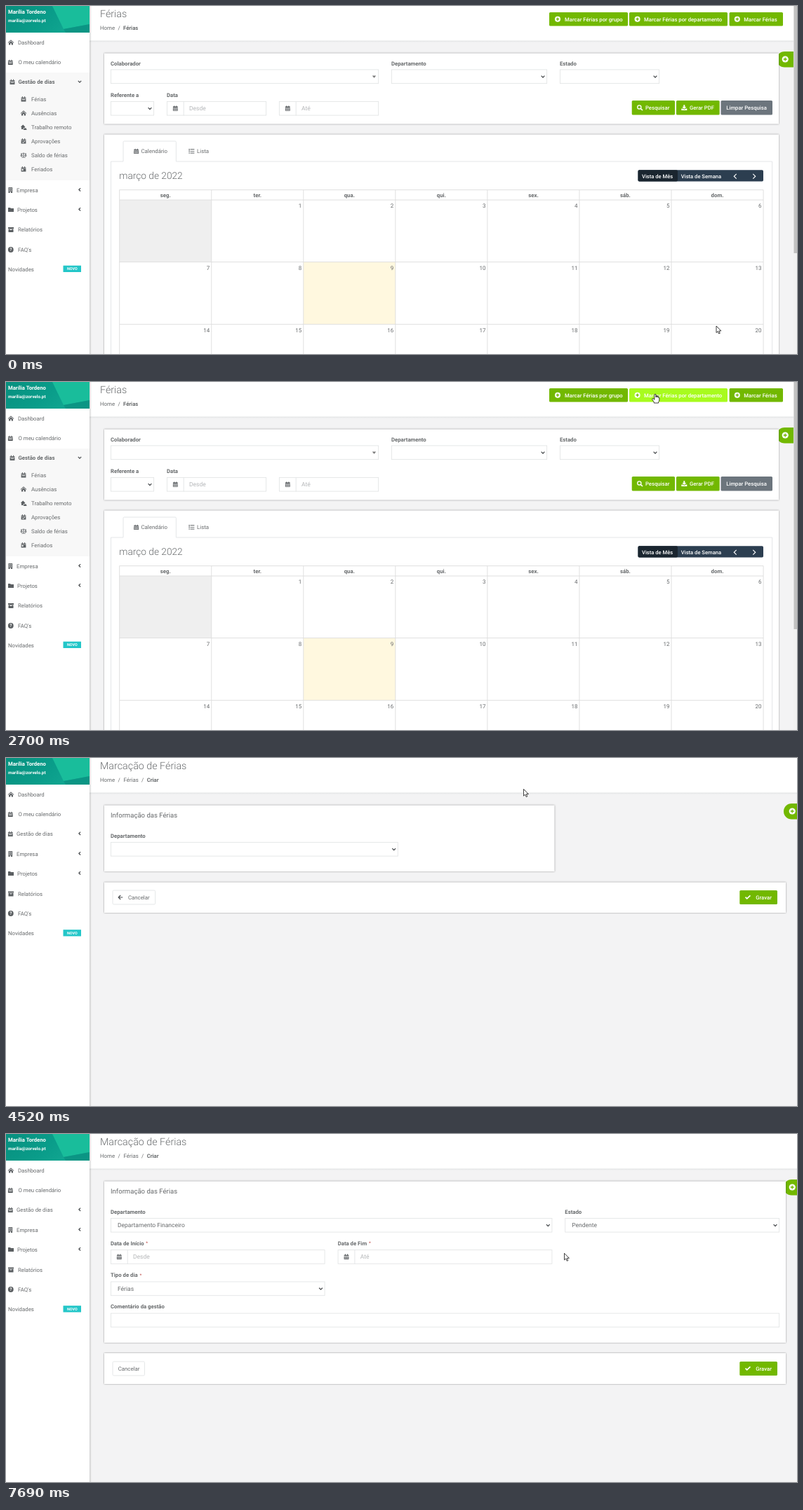
These frames come from a looping animation (1127x497 px, 8000 ms). An HTML page:

```html
<!DOCTYPE html>
<html lang="pt">
<head>
<meta charset="utf-8">
<title>Marcação de Férias</title>
<style>
  html, body { margin: 0; width: 100%; height: 100%; overflow: hidden; background: #f3f3f4; }
  svg { display: block; width: 1127px; height: 497px; }
  text { font-family: Roboto, "Open Sans", sans-serif; text-rendering: geometricPrecision; }
  .card { fill: #fff; filter: drop-shadow(0 .9px .8px rgba(0, 0, 0, .42)); }
</style>
</head>
<body>
<svg id="stage" viewBox="0 0 1127 497"></svg>
<script>
const GREEN = '#72b800', LIME = '#a8fb1e', GREY = '#676a6c', LINE = '#e3e5e6', GRID = '#dddddd';
const LOOP = 8000;

// Drawing helpers; text is placed by the middle of its capitals.
const text = (x, y, s, size = 7.85, weight = 400, fill = GREY, anchor = 'start') =>
  `<text x="${x}" y="${y + size * .355}" font-size="${size}" font-weight="${weight}" fill="${fill}" text-anchor="${anchor}">${s}</text>`;
const box = (x1, y1, x2, y2, fill, extra = '') =>
  `<rect x="${x1}" y="${y1}" width="${x2 - x1}" height="${y2 - y1}" fill="${fill}" ${extra}/>`;
const stroke = (d, color, width = 1, extra = '') =>
  `<path d="${d}" fill="none" stroke="${color}" stroke-width="${width}" ${extra}/>`;
const card = (x1, y1, x2, y2) => box(x1, y1, x2, y2, '#fff', 'class="card"');
const label = (x, y, s) => text(x, y, s, 7.75, 700);
const group = (id, body, hidden) => `<g id="${id}"${hidden ? ' display="none"' : ''}>${body}</g>`;

const CAL = 'M-3.4-2.6H-2.1V-3.8H-1V-2.6H1V-3.8H2.1V-2.6H3.4V-1.3H-3.4ZM-3.4-.7H3.4V3.6H-3.4Z';
const HOME = 'M-4.4 .2L0-3.8L4.4 .2L3.8 .8L0-2.6L-3.8 .8ZM-3 .9L0-1.8L3 .9V3.6H.8V1.3H-.8V3.6H-3Z';
const ICONS = {
  cal: CAL + 'M-2.2 .3V1.3H2.2V.3Z',
  days: CAL + 'M-2.5 .1V1H-1.2V.1ZM-.6 .1V1H.6V.1ZM1.2 .1V1H2.5V.1ZM-2.5 1.8V2.7H-1.2V1.8ZM-.6 1.8V2.7H.6V1.8ZM1.2 1.8V2.7H2.5V1.8Z',
  check: CAL + 'M-2 1.2L-.5 2.8L2.2 .3L1.6-.2L-.5 1.7L-1.4 .7Z',
  day: CAL + 'M-2.4 0V2H-.4V0Z',
  home: HOME,
  remote: 'M-4.2-.2L-.8-3.5L2.6-.2H1.6V1H-.4V3H-3V-.2ZM.3 1.5H4V3.3H4.6V4H-.1V3.3H.3Z',
  scale: 'M-4-2.6H-.5V-3.6H.5V-2.6H4V-1.9H3.4L4.5 1Q3 2.8 1.4 1L2.5-1.9H.5V2.8H2.8V3.5H-2.8V2.8H-.5V-1.9H-2.5L-1.4 1Q-3 2.8-4.5 1L-3.4-1.9H-4ZM-3-1L-3.7 .8H-2.3ZM3-1L2.3 .8H3.7Z',
  building: 'M-2.8-4H2.8V4H.7V2.2H-.7V4H-2.8ZM-1.7-3V-2.1H-.5V-3ZM.5-3V-2.1H1.7V-3ZM-1.7-1.2V-.3H-.5V-1.2ZM.5-1.2V-.3H1.7V-1.2ZM-1.7 .5V1.4H-.5V.5ZM.5 .5V1.4H1.7V.5Z',
  folder: 'M-4-3H-1L0-2H4V3H-4Z',
  archive: 'M-4-3.4H4V-1.6H-4ZM-3.5-1.1H3.5V3.4H-3.5ZM-1.2-.4V.4H1.2V-.4Z',
  list: 'M-4-3.3H-2.6V-1.9H-4ZM-1.8-3H4V-2.1H-1.8ZM-4-.7H-2.6V.7H-4ZM-1.8-.4H4V.4H-1.8ZM-4 1.9H-2.6V3.3H-4ZM-1.8 2.2H4V3.1H-1.8Z',
  download: 'M-1-4H1V-1.2H3L0 1.8L-3-1.2H-1ZM-4 1.4H-1.6L0 2.9L1.6 1.4H4V3.8H-4Z',
  tick: 'M-4 .3L-2.9-.9L-1.3 .7L2.9-3.3L4-2.1L-1.3 3.1Z',
};
const icon = (name, x, y, fill = '#5b5f62') =>
  `<path transform="translate(${x} ${y})" d="${ICONS[name]}" fill="${fill}" fill-rule="evenodd"/>`;
const plus = (x, y, r = 4, back = GREEN) =>
  `<circle cx="${x}" cy="${y}" r="${r}" fill="#fff"/>` + stroke(`M${x - r * .55} ${y}h${r * 1.1}M${x} ${y - r * .55}v${r * 1.1}`, back, 1.3);
const chevron = (x, y, dx, dy, color = '#4c4f52', width = 1.3) => dx
  ? stroke(`M${x + dx} ${y - 2 * Math.abs(dx)}L${x - dx} ${y}L${x + dx} ${y + 2 * Math.abs(dx)}`, color, width)
  : stroke(`M${x - 2 * dy} ${y - dy}L${x} ${y + dy}L${x + 2 * dy} ${y - dy}`, color, width);

const field = (x1, y1, x2, y2 = y1 + 20.5) => box(x1 + .4, y1 + .4, x2 - .4, y2 - .4, '#fff', `stroke="${LINE}" stroke-width=".9"`);
const select = (x1, y, x2, value = '') =>
  field(x1, y, x2) + chevron(x2 - 6, y + 10.3, 0, 1.2) + (value && text(x1 + 10, y + 10.3, value, 8.5));
const dateField = (x1, y, x2, hint) => field(x1, y, x2) + stroke(`M${x1 + 24.2} ${y}v20.5`, LINE, .9) +
  icon('days', x1 + 12.3, y + 10.2) + text(x1 + 32, y + 10.2, hint, 8.5, 400, '#b4b6b8');
const button = (x1, y1, x2, y2, fill, tx, s, id = '') =>
  box(x1, y1, x2, y2, fill, `rx="1.6"${id && ` id="${id}"`}`) + text(tx, (y1 + y2) / 2, s, 7.7, 500, '#fff');

function sidebar(open) {
  const rows = open ? [52, 80.5, 108.5, 263, 291, 319.5, 348, 376] : [52, 80.5, 108.5, 137, 165, 194, 222, 250.5];
  const names = ['Dashboard', 'O meu calendário', 'Gestão de dias', 'Empresa', 'Projetos', 'Relatórios', "FAQ's", 'Novidades'];
  const icons = ['home', 'cal', 'cal', 'building', 'folder', 'archive'];
  const lefts = [17, 17.5, open ? 17.5 : 15, 15, 16, 17, 17, 3];
  const subs = [['cal', 'Férias'], ['home', 'Ausências'], ['remote', 'Trabalho remoto'], ['check', 'Aprovações'], ['scale', 'Saldo de férias'], ['day', 'Feriados']];
  let s = box(0, 0, 119, 497, '#fff');
  if (open) {
    s += box(0, 95, 119, 249, '#f8f8f8');
    s += [['cal', 67, 95], ['manage', 95, 123], ['leave', 123.3, 143]]
      .map(([id, y1, y2]) => group('hover-' + id, box(0, y1, 119, y2, GREEN), true)).join('');
    s += subs.map(([i, name], k) => icon(i, 25, 133 + 20 * k) + text(36, 133 + 20 * k, name)).join('');
  }
  s += box(0, 0, 119, 38, 'url(#teal)') + '<path d="M66 0H119V26L82 33Z" fill="#19bd9b"/><path d="M82 33L119 26V38H85Z" fill="#0b9584"/>';
  s += text(3, 8, 'Marília Tordeno', 7.7, 700, '#fff') + text(3, 20.5, 'marilia@zorvelo.pt', 6.3, 700, '#fff');
  rows.forEach((y, k) => {
    const bold = open && k === 2;
    s += text(lefts[k], y, names[k], 7.8, bold ? 700 : 400);
    if (icons[k]) s += icon(icons[k], bold ? 9 : k === 0 || k > 3 ? 7 : 6.3, y);
    if (bold) s += chevron(105, y - .5, 0, 1.1);
    else if (k > 1 && k < 5) s += chevron(105, y - .7, 1.1, 0);
  });
  s += `<circle cx="6.8" cy="${rows[6]}" r="3.9" fill="#5b5f62"/>` + text(6.8, rows[6], '?', 6.5, 700, '#fff', 'middle');
  return s + box(81.5, rows[7] - 5.3, 107, rows[7] + 4, '#23c6c8') + text(94.3, rows[7] - .6, 'NOVO', 5.4, 700, '#fff', 'middle');
}

function frame(open, title, crumbs) {
  const edge = open ? 1122 : 1127, x = open ? 1098 : 1108;
  let s = box(0, 0, 1127, 497, '#f3f3f4') + box(119, 0, edge, 52, 'url(#under)') + box(119, 0, edge, 49.5, '#fff');
  s += sidebar(open) + box(119, 0, 122, 497, 'url(#side)');
  s += text(134, 11, title, 14.3, 300) + crumbs;
  s += `<path d="M${edge} 65H${x + 11.3}a11.3 11.3 0 0 0 0 22.6H${edge}Z" fill="${GREEN}"/>` + plus(x + 12.2, 76, 4.6);
  return open ? s + box(1122, 0, 1127, 497, '#f1f1f1') + box(1122.5, 0, 1127, 353, '#c1c1c1') : s;
}

function calendar() {
  const left = 161.7, col = 131.05, right = left + 7 * col, tops = [277, 365.6, 454.6];
  const days = ['seg.', 'ter.', 'qua.', 'qui.', 'sex.', 'sáb.', 'dom.'];
  let s = box(left, 277, left + col, 365.6, '#efefef') + box(left + 2 * col, 365.6, left + 3 * col, 454.6, '#fff8df');
  let lines = `M${left} 262.6H${right}` + tops.map(y => `M${left} ${y}H${right}`).join('');
  for (let c = 0; c <= 7; c++) lines += `M${left + c * col} 262.6V497`;
  s += stroke(lines, GRID, .9);
  days.forEach((d, c) => {
    s += text(left + (c + .5) * col, 269.8, d, 7.8, 700, GREY, 'middle');
    tops.forEach((y, r) => {
      const n = r * 7 + c;
      if (n) s += text(left + (c + 1) * col - 2.5, y + 8.4, n, 8, 400, GREY, 'end');
    });
  });
  return s;
}

function listPage() {
  let s = frame(true, 'Férias', text(134, 31.3, 'Home') + text(159.5, 31.3, '/') + text(167, 31.3, 'Férias', 7.7, 700));
  s += button(774, 9, 886, 28.6, GREEN, 796, 'Marcar Férias por grupo', 'btn-group') + plus(786, 18.7);
  s += button(888, 9, 1028, 28.6, GREEN, 909, 'Marcar Férias por departamento', 'btn-dept') + plus(899.6, 18.7);
  s += button(1030.6, 9, 1107, 28.6, GREEN, 1051.3, 'Marcar Férias') + plus(1041.8, 18.7);
  s += card(140, 67.5, 1101, 168.5);
  s += label(149, 82, 'Colaborador') + field(149, 90.5, 531) + '<path d="M521.8 99.4h5.4l-2.7 3.4Z" fill="#777"/>';
  s += label(549, 82, 'Departamento') + select(549, 90.5, 771) + label(789, 82, 'Estado') + select(789, 90.5, 931);
  s += label(149, 127, 'Referente a') + select(149, 136, 211);
  s += label(229, 127, 'Data') + dateField(229, 136, 371, 'Desde') + dateField(389, 136, 531, 'Até');
  s += button(891.7, 135, 953, 155.6, GREEN, 911, 'Pesquisar');
  s += '<circle cx="902.3" cy="144.4" r="2.6" fill="none" stroke="#fff" stroke-width="1.3"/>' + stroke('M904.2 146.3L907 149', '#fff', 1.6);
  s += button(955, 135, 1016.7, 155.6, GREEN, 974, 'Gerar PDF') + icon('download', 966.3, 145.2, '#fff');
  s += button(1018.5, 135, 1092, 155.6, '#6c757d', 1026.3, 'Limpar Pesquisa');
  s += card(140, 183.5, 1101, 510);
  s += stroke('M149.5 497V222H167V194.5Q167 193 168.5 193H241Q242.4 193 242.4 194.5V222H1091.6V497', '#e1e4e6', .9);
  s += icon('days', 185.6, 207.5) + text(192.5, 207.5, 'Calendário') + icon('list', 264.4, 207.3) + text(272, 207.5, 'Lista');
  s += text(161.3, 242.2, 'março de 2022', 13.7, 300);
  s += box(900.5, 234.2, 1079, 250.6, '#2c3e50', 'rx="1.8"') + box(900.5, 234.2, 957, 250.6, '#1a252f', 'rx="1.8"');
  s += text(906, 243, 'Vista de Mês', 7.6, 500, '#fff') + text(961.8, 243, 'Vista de Semana', 7.6, 500, '#fff');
  return s + chevron(1039, 243.2, 1.7, 0, '#fff', 1.2) + chevron(1066, 243.2, -1.7, 0, '#fff', 1.2) + calendar();
}

const createFrame = () => frame(false, 'Marcação de Férias', text(134, 31.3, 'Home') + text(159.5, 31.3, '/') +
  text(167.5, 31.3, 'Férias') + text(193, 31.3, '/') + text(200.7, 31.3, 'Criar', 7.7, 700));
const formTitle = text(149, 82, 'Informação das Férias', 9.55) + label(149, 111, 'Departamento');
const save = y => button(1045.3, y, 1099, y + 20, GREEN, 1068.3, 'Gravar') + icon('tick', 1057, y + 10, '#fff');
const cancel = (x2, y, tx) => box(152, y, x2, y + 20, '#fff', `rx="1.6" stroke="${LINE}" stroke-width=".9"`) + text(tx, y + 10, 'Cancelar', 7.8);

function departmentPage() {
  let s = createFrame() + card(140, 67.5, 781.5, 162) + formTitle + select(149, 120, 558.7);
  s += card(140, 177.5, 1111, 221) + cancel(212.7, 189, 174) + save(189);
  s += stroke('M166.3 199H160.4M163.2 196L160.2 199L163.2 202', '#4c4f52', 1.2);
  s += group('focus', box(149.5, 120.4, 558.3, 140.3, 'none', `stroke="${GREEN}" stroke-width="1"`), true);
  s += group('chosen', text(159, 130.4, 'Departamento Financeiro', 8.5), true);
  const menu = box(149.4, 141, 558.4, 173.8, '#fff', 'stroke="#6b6b6b" stroke-width=".8" style="filter:drop-shadow(0 1px 1.5px rgba(0,0,0,.3))"') +
    box(149.8, 141.2, 558, 152, '#1e90ff', 'id="mark"') +
    `<g id="option">${text(159, 157, 'Departamento Financeiro', 8.5, 400, 'inherit')}</g>` + text(159, 167.8, 'Departamento de Produção', 8.5, 400, '#555');
  return s + group('menu', menu, true);
}

function fullPage() {
  const star = (x, y) => text(x, y, '*', 6.5, 400, '#c0504d');
  let s = createFrame() + card(140, 67.5, 1111, 298) + formTitle + select(149, 120, 778.3, 'Departamento Financeiro');
  s += label(796.3, 111, 'Estado') + select(796.3, 120, 1102, 'Pendente');
  s += label(149, 156, 'Data de Início') + star(199.3, 156) + dateField(149, 165.2, 454.5, 'Desde');
  s += label(472.7, 156, 'Data de Fim') + star(517, 156) + dateField(472.7, 165.2, 778.3, 'Até');
  s += label(149, 201.7, 'Tipo de dia') + star(190.5, 201.7) + select(149, 210.6, 454.5, 'Férias');
  s += label(149, 246.5, 'Comentário da gestão') + field(149, 255.7, 1102);
  return s + card(140, 313, 1111, 357) + cancel(197.5, 325, 159.7) + save(325);
}

const gradient = (id, x2, y2, stops) => `<linearGradient id="${id}" x2="${x2}" y2="${y2}">` +
  stops.map(([o, c, a = 1]) => `<stop offset="${o}" stop-color="${c}" stop-opacity="${a}"/>`).join('') + '</linearGradient>';
document.getElementById('stage').innerHTML = '<defs>' +
  gradient('teal', 1, .3, [[0, '#07907f'], [.6, '#0a9d8a'], [1, '#12a892']]) +
  gradient('under', 0, 1, [[.92, '#d3d5d6'], [1, '#f3f3f4']]) +
  gradient('side', 1, 0, [[0, '#000', .16], [1, '#000', 0]]) + '</defs>' +
  group('list', listPage()) + group('department', departmentPage(), true) + group('full', fullPage(), true) +
  group('arrow', '<path d="M0 0V9.6L2.2 7.6L3.7 11L5.3 10.3L3.8 7H6.9Z" fill="#fff" stroke="#111" stroke-width=".8"/>') +
  group('hand', '<path d="M-1.1 1Q0-.8 1 1V4.6Q2-.0 2.8 4.8Q4-.0 4.3 5.2Q5.6 3.8 5.8 6V9Q5.5 10.8 4.6 11.5V13H-1.8V11.6Q-3.2 10-4.3 7.6Q-4.2 5.6-2.4 7L-1.1 8.2Z" fill="#fff" stroke="#111" stroke-width=".8"/>', true);

// Pointer moves: first and last step time, number of steps, end point.
const START = [1012, 457];
const MOVES = [
  [70, 440, 6, 60, 82], [830, 910, 2, 80, 108], [1220, 1680, 7, 100, 131], [1910, 1910, 1, 115.5, 121],
  [1990, 2700, 10, 925, 17], [2790, 2790, 1, 876, 15], [2870, 3030, 3, 912.5, 14.5],
  [4520, 4520, 1, 737.5, 44.5], [4600, 4900, 5, 576.5, 118.5], [5050, 5200, 3, 554.5, 130],
  [5830, 5830, 1, 530, 140.3], [6230, 6230, 1, 526.5, 146], [6370, 6450, 2, 526, 151.5], [6680, 6850, 3, 525.7, 154],
  [7320, 7460, 3, 795.5, 170.3],
];
const HOVERS = [[0, ''], [370, 'cal'], [830, 'manage'], [1300, 'leave'], [1990, ''], [2620, 'dept'], [2790, 'group'], [2870, 'dept'], [3660, '']];

function pointer(t) {
  let [x, y] = START;
  for (const [from, to, steps, endX, endY] of MOVES) {
    if (t < from) break;
    const step = steps === 1 ? 1 : Math.min(steps, 1 + Math.floor((t - from) / (to - from) * (steps - 1) + 1e-6));
    const u = step / steps, e = u * u * (3 - 2 * u);
    x += (endX - x) * e;
    y += (endY - y) * e;
  }
  return [x, y];
}

const $ = id => document.getElementById(id);
const show = (id, on) => $(id).setAttribute('display', on ? 'inline' : 'none');

function render(t) {
  const hover = HOVERS.filter(([from]) => t >= from).pop()[1];
  show('list', t < 3660);
  show('department', t >= 3660 && t < 7690);
  show('full', t >= 7690);
  ['cal', 'manage', 'leave'].forEach(id => show('hover-' + id, hover === id));
  ['group', 'dept'].forEach(id => $('btn-' + id).setAttribute('fill', hover === id ? LIME : GREEN));
  show('focus', t >= 5370);
  show('menu', t >= 5450 && t < 6680);
  show('chosen', t >= 6680);
  const second = t >= 6370;
  $('mark').setAttribute('y', second ? 152 : 141.2);
  $('option').setAttribute('fill', second ? '#fff' : '#555');
  $('option').firstChild.setAttribute('fill', second ? '#fff' : '#555');
  const hand = hover !== '' && t < 3510 || t >= 1910 && t < 1990;
  const [x, y] = pointer(t);
  for (const id of ['arrow', 'hand']) {
    show(id, (id === 'hand') === hand);
    $(id).setAttribute('transform', `translate(${x} ${y})`);
  }
}

const began = performance.now();
function tick() {
  render((performance.now() - began) % LOOP);
  requestAnimationFrame(tick);
}
tick();
</script>
</body>
</html>
```
